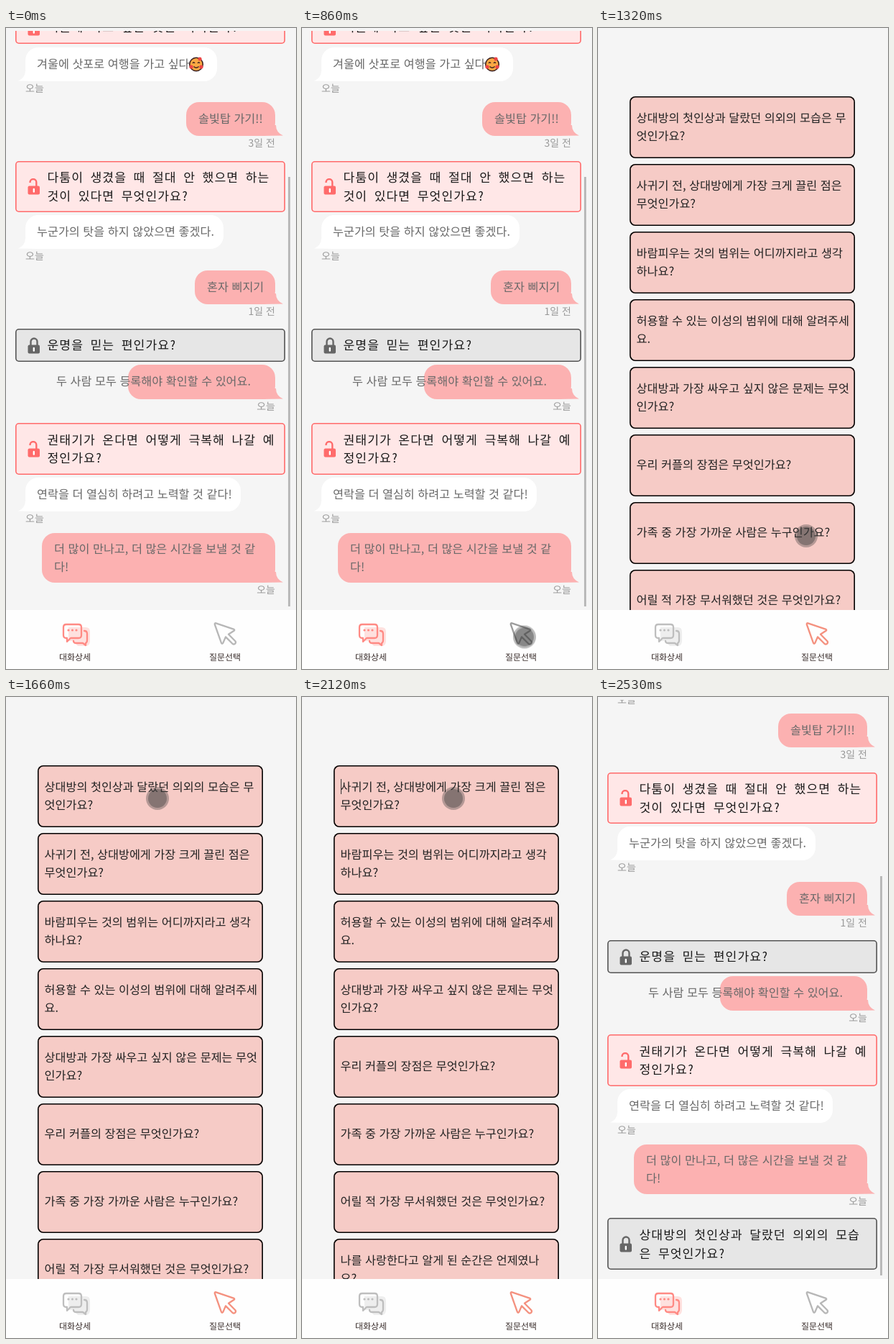
These frames come from a looping animation (404x891 px, 3.39 s). An HTML page:

```html
<!DOCTYPE html>
<html lang="ko">
<head>
<meta charset="utf-8">
<title>대화상세</title>
<style>
  html, body { margin: 0; width: 100%; height: 100%; overflow: hidden; background: #f5f5f5; }
  body { position: relative; font: 16.25px/25.5px "Noto Sans CJK KR", "Noto Sans CJK", sans-serif;
    white-space: nowrap; text-rendering: geometricPrecision; }
  body * { box-sizing: border-box; }
  body div, body svg { position: absolute; }
  .chat, .feed, .bar, .list, .deck, .caret, .dot, .icon { animation: 3390ms step-end infinite; }

  .chat { inset: 0; animation-name: chat; }
  .view { left: 0; top: 4px; width: 404px; height: 800px; overflow: hidden; }
  .feed { left: 0; top: -4px; width: 404px; animation-name: feed; }
  .bar { left: 392.5px; width: 3.5px; top: 207px; bottom: 87px; background: #b9b9b9; animation-name: bar; }

  /* inset shadows keep fractional line weights, borders are rounded down */
  .card { left: 13px; width: 375.5px; box-shadow: inset 0 0 0 1.6px #ff6b6b; border-radius: 5px; background: #ffe7e7; color: #ff6b6b; }
  .card.shut { box-shadow: inset 0 0 0 1.6px #555; background: #e6e6e6; color: #666; }
  .card svg { left: 17px; top: 50%; margin-top: -11px; }
  .card div { left: 44.5px; top: 50%; transform: translateY(calc(-50% - 1px)); color: #1a1a1a; letter-spacing: 1px;
    font: 500 17.2px/25.5px "Noto Sans Mono CJK KR", "Noto Sans CJK KR", monospace; }
  .bubble { border-radius: 18px; background: #fff; }
  .bubble.mine { background: #fcb1b1; }
  .bubble div { top: 50%; transform: translateY(calc(-50% - 1px)); color: #686868; }
  .bubble svg { bottom: 0; left: -10px; fill: #fff; }
  .bubble.mine > svg { left: auto; right: -11px; fill: #fcb1b1; transform: scaleX(-1); }
  .date { font-size: 14px; line-height: 20px; color: #999; left: 27px; }
  .date.mine { left: auto; right: 29px; }

  .list { left: 0; top: 94px; width: 404px; height: 716px; overflow: hidden; visibility: hidden; animation-name: list; }
  .deck { left: 44px; top: 0; width: 314px; animation-name: deck; }
  .ask { left: 0; width: 313.5px; height: 86px; box-shadow: inset 0 0 0 1.6px #000; border-radius: 8px; background: #f6cbc6; color: #222; }
  .ask div { left: 9.6px; top: 50%; transform: translateY(calc(-50% - 1px)); }
  .caret { left: 54px; top: 20px; width: 1px; height: 21px; background: #333; visibility: hidden; animation-name: caret; }

  .nav { left: 0; top: 809px; width: 404px; height: 82px; background: #fefefe; }
  .nav div { top: 57px; width: 80px; text-align: center; font-size: 12px; line-height: 18px; color: #3a2e2c; }
  .icon { top: 0; fill: none; stroke: currentColor; stroke-width: 2.3; stroke-linejoin: round; stroke-linecap: round; }
  .talk { left: 70px; animation-name: talk; }
  .pick { left: 280px; animation-name: pick; }

  .dot { left: -16px; top: -16px; width: 32px; height: 32px; border-radius: 50%; background: rgba(60,60,60,.35); visibility: hidden; animation-name: dot; }
  .dot::after { content: ""; position: absolute; inset: 3px; border-radius: 50%; background: rgba(60,60,60,.4); }

  @keyframes chat { 0% { visibility: visible } 27.43% { visibility: hidden } 64.6%, 100% { visibility: visible } }
  @keyframes feed { 0% { transform: none } 64.6%, 100% { transform: translateY(-80px) } }
  @keyframes bar { 0% { top: 207px } 64.6%, 100% { top: 249px } }
  @keyframes list { 0% { visibility: hidden } 27.43% { visibility: visible } 64.6%, 100% { visibility: hidden } }
  @keyframes deck { 0% { transform: none } 60.7%, 100% { transform: translateY(-94px) } }
  @keyframes caret { 0% { visibility: hidden } 60.7% { visibility: visible } 64.6%, 100% { visibility: hidden } }
  @keyframes talk { 0% { color: #ff8a84 } 27.43% { color: #bebebe } 64.6%, 100% { color: #ff8a84 } }
  @keyframes pick { 0% { color: #b7b7b7 } 23.59% { color: #9c9c9c } 27.43% { color: #f29a68 }
    36.87% { color: #f4917f } 64.6%, 100% { color: #b7b7b7 } }
  @keyframes dot {
    0% { visibility: hidden; transform: translate(352px, 880px) }
    7.66% { visibility: visible; transform: translate(352px, 880px) }
    9.73% { visibility: visible; transform: translate(329px, 862px) }
    11.79% { visibility: visible; transform: translate(316px, 851px) }
    13.86% { visibility: visible; transform: translate(310px, 847.5px) }
    17.99% { visibility: visible; transform: translate(310px, 846.5px) }
    36.87% { visibility: visible; transform: translate(305px, 807px) }
    38.93% { visibility: visible; transform: translate(290px, 706px) }
    41% { visibility: visible; transform: translate(271px, 568px) }
    43.06% { visibility: visible; transform: translate(250px, 418px) }
    45.13% { visibility: visible; transform: translate(231px, 280px) }
    46.9% { visibility: visible; transform: translate(216px, 179px) }
    48.96% { visibility: visible; transform: translate(211px, 141px) }
    68.73% { visibility: visible; transform: translate(246px, 207px) }
    70.7% { visibility: visible; transform: translate(304px, 345px) }
    72.56% { visibility: visible; transform: translate(373px, 499px) }
    74.63%, 100% { visibility: hidden; transform: translate(373px, 499px) }
  }
</style>
</head>
<body>
<div class="chat">
  <div class="view"><div class="feed" id="feed"></div></div>
  <div class="bar"></div>
</div>
<div class="list"><div class="deck" id="deck"></div><div class="caret"></div></div>
<div class="nav">
  <svg class="icon talk" width="52" height="56">
    <path d="M17 24h24q6 0 6 6v13q0 5-4 7H30l-6-7h-7z" fill="currentColor" stroke="none" opacity=".25"/>
    <path d="M14 20h17q4 0 4 4v11q0 4-4 4H20l-5 5v-5h-1q-4 0-4-4V24q0-4 4-4z"/>
    <path d="M39 29q4 0 4 4v9q0 3-2 4v3l-4-3H28q-4 0-4-3"/>
    <path d="M17 28h.01M22.5 28h.01M28 28h.01" stroke-width="3.2"/>
  </svg>
  <svg class="icon pick" width="52" height="56">
    <path d="M12.5 18.3L37 26.6q2.6 1.2 0 2.7l-7 4.5 9.4 9.4q1.4 1.8-.2 3.6-2 1.5-3.8 0L26 37.4l-3.6 8.4q-1.4 2-2.4 0L10.8 20q-.3-2 1.7-1.7z"/>
  </svg>
  <div style="left:56px">대화상세</div>
  <div style="left:265px">질문선택</div>
</div>
<div class="dot"></div>

<script>
const feed = document.getElementById("feed");
const deck = document.getElementById("deck");
const add = (box, html) => box.insertAdjacentHTML("beforeend", html);

const lock = open => `<svg width="18" height="23">
  <path d="${open ? "M3.5 6V5.5a4.4 4.4 0 0 1 8.8 0V12" : "M4.5 12V6a4.5 4.5 0 0 1 9 0V12"}" fill="none" stroke="currentColor" stroke-width="2.4"/>
  <rect x=".5" y="10.5" width="16.5" height="12" rx="2" fill="currentColor"/>
  <path d="M8.8 15v3.5" stroke="#fff" stroke-width="2.4" stroke-linecap="round"/></svg>`;
const tail = `<svg width="30" height="16"><path d="M10 1Q10 11 0 15.5L30 16V1z"/></svg>`;
const face = `<svg style="left:227px;top:12px" width="22" height="23">
  <circle cx="11" cy="11.5" r="9.3" fill="#f9a843" stroke="#3a2020" stroke-width="1.5"/>
  <path d="M6 10q1.5-2.5 3 0M13 10q1.5-2.5 3 0M7.5 14.5q3.5 3.5 7 0" fill="none" stroke="#3a2020" stroke-width="1.3"/>
  <g fill="#ee4545"><circle cx="4" cy="15" r="2.6"/><circle cx="18" cy="15" r="2.6"/><circle cx="16" cy="4" r="2.6"/></g></svg>`;

function card(y, h, text, open) {
  add(feed, `<div class="card ${open ? "" : "shut"}" style="top:${y}px;height:${h}px">${lock(open)}<div>${text}</div></div>`);
}
function bubble(side, x, y, w, h, text, date, pad = 17) {
  add(feed, `<div class="bubble ${side}" style="left:${x}px;top:${y}px;width:${w}px;height:${h}px">${tail}<div style="left:${pad}px">${text}</div></div>
    <div class="date ${side}" style="top:${y + h}px">${date}</div>`);
}

card(-24, 46, "겨울에 가고 싶은 곳은 어디인가?", true);
bubble("", 27, 27, 267, 47, "겨울에 삿포로 여행을 가고 싶다", "오늘", 16);
add(feed.querySelector(".bubble"), face);
bubble("mine", 251, 103, 124, 47, "솔빛탑 가기!!", "3일 전");
card(184.5, 71.5, "다툼이 생겼을 때 절대 안 했으면 하는<br>것이 있다면 무엇인가요?", true);
bubble("", 27, 260, 276, 47, "누군가의 탓을 하지 않았으면 좋겠다.", "오늘", 16);
bubble("mine", 263, 337, 112, 47, "혼자 삐지기", "1일 전");
card(418, 46, "운명을 믿는 편인가요?", false);
bubble("mine", 170, 468, 205, 47.5, "두 사람 모두 등록해야 확인할 수 있어요.", "오늘", -100);
card(549, 71.5, "권태기가 온다면 어떻게 극복해 나갈 예<br>정인가요?", true);
bubble("", 27, 625, 300, 47, "연락을 더 열심히 하려고 노력할 것 같다!", "오늘", 16);
bubble("mine", 50, 702, 325, 69, "더 많이 만나고, 더 많은 시간을 보낼 것 같<br>다!", "오늘");
card(804.4, 72, "상대방의 첫인상과 달랐던 의외의 모습<br>은 무엇인가요?", false);

[
  "상대방의 첫인상과 달랐던 의외의 모습은 무<br>엇인가요?",
  "사귀기 전, 상대방에게 가장 크게 끌린 점은<br>무엇인가요?",
  "바람피우는 것의 범위는 어디까지라고 생각<br>하나요?",
  "허용할 수 있는 이성의 범위에 대해 알려주세<br>요.",
  "상대방과 가장 싸우고 싶지 않은 문제는 무엇<br>인가요?",
  "우리 커플의 장점은 무엇인가요?",
  "가족 중 가장 가까운 사람은 누구인가요?",
  "어릴 적 가장 무서워했던 것은 무엇인가요?",
  "나를 사랑한다고 알게 된 순간은 언제였나<br>요?"
].forEach((text, i) => add(deck, `<div class="ask" style="top:${i * 94 + .7}px"><div>${text}</div></div>`));
</script>
</body>
</html>
```
